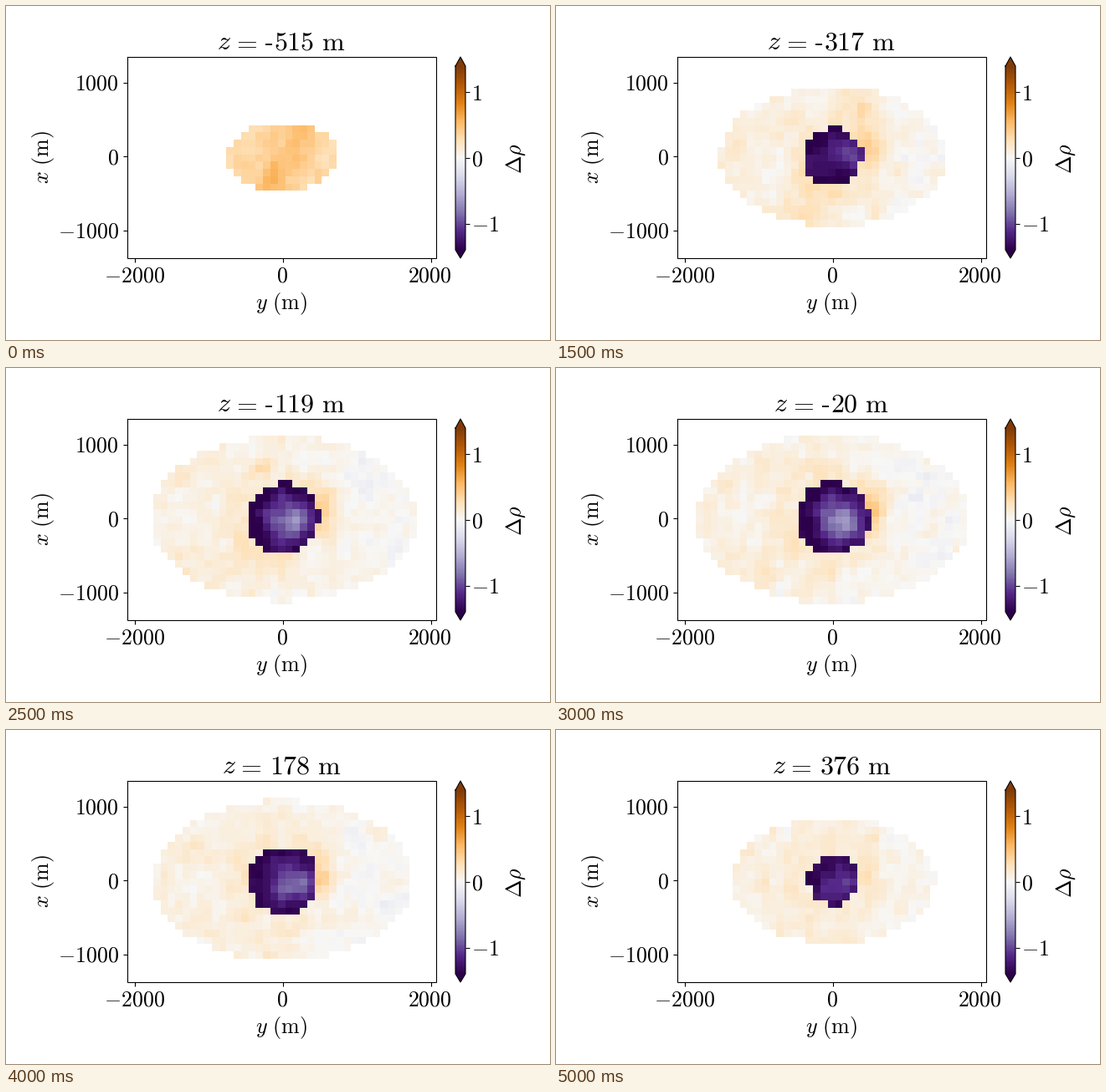
A matplotlib script for the animation above (5500 ms loop, 650 px wide and 400 px high).

```python
import matplotlib.pyplot as plt
import numpy as np
from matplotlib.animation import FuncAnimation

plt.rcParams["mathtext.fontset"] = "cm"

WIDTH, HEIGHT, DPI = 650, 400, 100
CELL, OFFSET, SCALE = 99, -20, 0.08845      # metres, metres, pixels per metre
ORIGIN_X, ORIGIN_Y = 330.9, 180.2           # pixel position of (0, 0)
LEFT, RIGHT, TOP, BOTTOM = 145, 514, 61, 302
BODY_Y, BODY_X, BODY_Z = 1840, 1140, 565    # ellipsoid semi-axes
CORE_RADIUS = 500
LIMIT = 1.4
LINE = 0.8
LABEL_SIZE, TITLE_SIZE = 18.7, 23

HEIGHTS = OFFSET + CELL * np.arange(-5, 5)
COLS, ROWS = np.arange(-19, 20), np.arange(-12, 13)
Y, X = np.meshgrid(OFFSET + CELL * COLS, OFFSET + CELL * ROWS)


def bell(value, centre, spread):
    return np.exp(-((value - centre) / spread) ** 2)


def texture():
    """Seeded noise, softened by its neighbours along every axis."""
    grain = np.random.default_rng(7).normal(size=(len(HEIGHTS),) + Y.shape)
    soft = grain
    for axis in range(3):
        soft = soft + np.roll(soft, 1, axis)
    return 0.014 * soft + 0.012 * grain


def shell_density(z):
    radius = np.hypot(Y, X)
    depth = (z / BODY_Z) ** 2
    base = 0.06 + 0.24 * (z / 515) ** 10 - 0.04 * np.tanh(Y / 800)
    ring = 0.12 * bell(radius, 500, 300)
    hot_side = 0.3 * bell(Y, 500, 150) * bell(X, 80, 320)
    low = 1 / (1 + np.exp((z + 250) / 60))
    diagonal = 0.2 * low * bell(0.88 * Y - 0.47 * X, 50, 260)
    return base + (ring + hot_side) * (1 - depth) + diagonal


def core_density(z):
    return -1.45 + 0.75 * bell(Y, 110, 350) * bell(X, -20, 320) * bell(z, 20, 395)


def density(z, noise):
    body = (Y / BODY_Y) ** 2 + (X / BODY_X) ** 2 + (z / BODY_Z) ** 2 <= 1
    core = Y ** 2 + X ** 2 + z ** 2 <= CORE_RADIUS ** 2
    value = np.where(core, core_density(z) + 1.5 * noise, shell_density(z) + noise)
    return np.ma.masked_where(~body, value)


def px(y):
    return ORIGIN_X + SCALE * y


def py(x):
    return ORIGIN_Y - SCALE * x


fig = plt.figure(figsize=(WIDTH / DPI, HEIGHT / DPI), dpi=DPI, facecolor="white")
ax = fig.add_axes([0, 0, 1, 1])
ax.set_autoscale_on(False)
ax.set_xlim(0, WIDTH)
ax.set_ylim(HEIGHT, 0)
ax.axis("off")


def line(xs, ys, width=LINE, **kw):
    return ax.plot(xs, ys, color="black", lw=width, **kw)[0]


def label(x, y, text, size=LABEL_SIZE, ha="center", **kw):
    return ax.text(x, y, f"${text}$", size=size, ha=ha, va="baseline", **kw)


def edges(index):
    return OFFSET + CELL * (np.append(index, index[-1] + 1) - 0.5)


cmap = plt.get_cmap("PuOr_r")
style = dict(cmap=cmap, vmin=-LIMIT, vmax=LIMIT, antialiased=False)
slices = [density(z, noise) for z, noise in zip(HEIGHTS, texture())]
mesh = ax.pcolormesh(px(edges(COLS)), py(edges(ROWS)), slices[0], **style)

# Frame, ticks and axis labels
line([LEFT, RIGHT, RIGHT, LEFT, LEFT], [TOP, TOP, BOTTOM, BOTTOM, TOP],
     solid_joinstyle="miter", solid_capstyle="projecting")
for v in (-2000, 0, 2000):
    line([px(v)] * 2, [BOTTOM, BOTTOM + 5], solid_capstyle="butt")
    label(px(v) - 0.9, 330.5, v)
for v in (-1000, 0, 1000):
    line([LEFT - 5, LEFT], [py(v)] * 2, solid_capstyle="butt")
    label(134.7, py(v) + 9, v, ha="right")
label(329, 363.3, r"y\ \mathrm{(m)}")
label(50.5, 181.5, r"x\ \mathrm{(m)}", rotation=90, rotation_mode="anchor")

# Colour bar with pointed ends
BAR_L, BAR_R, BAR_T, BAR_B = 537, 549, 72, 292
BAR_X, BAR_Y = (BAR_L + BAR_R) / 2, (BAR_T + BAR_B) / 2
for base, tip, shade in ((BAR_T, TOP, 1.0), (BAR_B, BOTTOM, 0.0)):
    inner = base + np.sign(base - tip)      # overlaps the bar to hide the seam
    ax.fill([BAR_L, BAR_L, BAR_X, BAR_R, BAR_R], [inner, base, tip, base, inner],
            color=cmap(shade), lw=0, zorder=0.5)
levels = np.linspace(-LIMIT, LIMIT, 257)
ax.pcolormesh([BAR_L, BAR_R], np.linspace(BAR_B, BAR_T, 257),
              ((levels[1:] + levels[:-1]) / 2)[:, None], **style)
line([BAR_L, BAR_X, BAR_R, BAR_R, BAR_X, BAR_L, BAR_L],
     [BAR_T, TOP, BAR_T, BAR_B, BOTTOM, BAR_B, BAR_T])
for v in (-1, 0, 1):
    y = BAR_Y - v * (BAR_B - BAR_T) / (2 * LIMIT)
    line([BAR_R, BAR_R + 5], [y, y], solid_capstyle="butt")
    label(556.5, y + 9.2, v, ha="left")
label(616, 182.5, r"\Delta\rho", rotation=90, rotation_mode="anchor")

# Title pieces share one baseline; advances are in em
TITLE_X, TITLE_Y = 329, 52.4
EM = TITLE_SIZE * DPI / 72
Z_WIDTH, GAP, EQUALS, HYPHEN, DIGIT, UNIT = 0.465, 0.278, 0.778, 0.333, 0.5, 1.166
title_z = label(0, TITLE_Y, "z", TITLE_SIZE, "left")
title_eq = label(0, TITLE_Y, "=", TITLE_SIZE)
title_num = label(0, TITLE_Y, "0", TITLE_SIZE, "left")
hyphen = line([0, 0], [TITLE_Y - 0.216 * EM] * 2, 0.058 * TITLE_SIZE,
              solid_capstyle="butt")


def set_title(z):
    digits = str(abs(z))
    sign = HYPHEN if z < 0 else 0
    head = Z_WIDTH + GAP + EQUALS + GAP
    total = head + sign + DIGIT * len(digits) + UNIT
    start = TITLE_X - total * EM / 2
    title_z.set_x(start)
    # mathtext pads only the left of a lone relation sign
    title_eq.set_x(start + (Z_WIDTH + GAP + EQUALS / 2 - 0.1) * EM)
    hyphen.set_xdata([start + head * EM, start + (head + 0.27) * EM])
    hyphen.set_visible(z < 0)
    title_num.set_x(start + (head + sign) * EM)
    title_num.set_text(rf"$\mathrm{{{digits}\ m}}$")


def update(frame):
    index = max(0, frame - 1)       # the lowest slice is held twice as long
    mesh.set_array(slices[index])
    set_title(int(HEIGHTS[index]))
    return mesh, title_z, title_eq, title_num, hyphen


anim = FuncAnimation(fig, update, frames=11, interval=500, repeat=True,
                     repeat_delay=0, blit=False)
plt.show()
```
